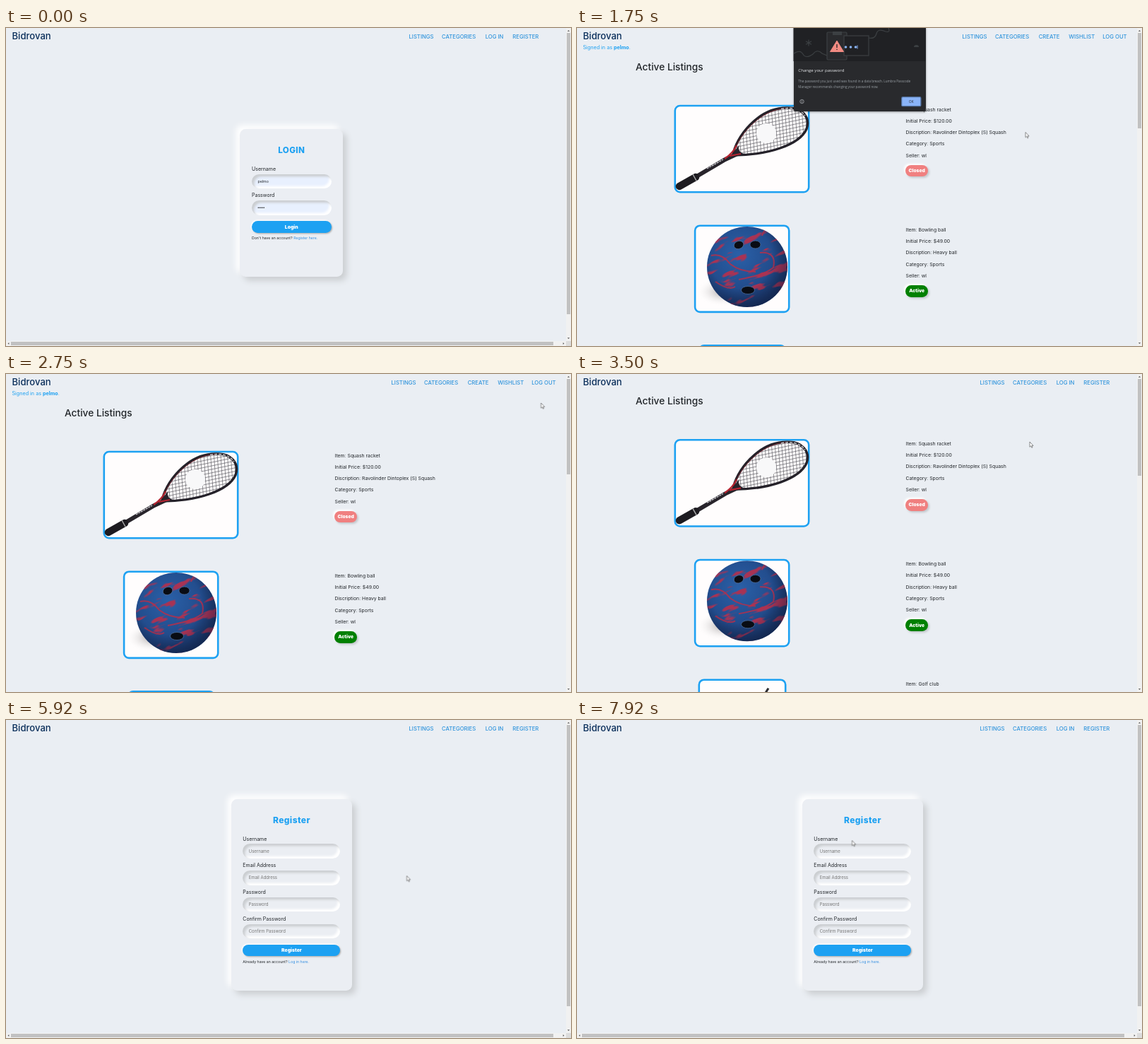
Animation of 800 by 450 pixels, one loop 8 s. Source, as an HTML page:

```html
<!DOCTYPE html>
<html lang="en">
<head>
<meta charset="utf-8">
<title>Bidding site walkthrough</title>
<style>
html, body { margin: 0; width: 100%; height: 100%; overflow: hidden; background: #eaeef3; }
#stage { position: relative; width: 800px; height: 450px; overflow: hidden; background: #eaeef3; }
#stage div { position: absolute; box-sizing: border-box; }
svg { position: absolute; left: 0; top: 0; width: 800px; height: 450px; overflow: hidden; }
#stage .defs { width: 0; height: 0; }
text { font-family: Inter, sans-serif; fill: #212529; white-space: pre; }
.page { inset: 0; }
.card { border-radius: 8.3px; background: #ebeef3; box-shadow: 5.4px 5.4px 8.3px #cbced1, -5.4px -5.4px 8.3px #fff; }
.field { border-radius: 10.4px; background: #ebeef3; box-shadow: inset 3.3px 3.3px 3.3px #cbced1, inset -3.3px -3.3px 3.3px #fff; }
.filled { background: #e8f0fe; }
.button { border-radius: 8.4px; background: #1da1f2; box-shadow: 1.25px 1.25px 2px #b1b1b1, -1.25px -1.25px 2px #fff; }
.badge { border-radius: 8.2px; box-shadow: 2px 2px 3px #c3c7cc, -2px -2px 3px #fff; }
.picture { fill: #fffdfd; stroke: #1da1f2; stroke-width: 2.6; }
.track { background: #f1f1f1; }
.thumb { background: #c1c1c1; }
.dark { background: #292a2d; border-radius: 2px; box-shadow: 0 1px 3px #0006; }
.ui text { font-family: "Open Sans", sans-serif; fill: #e8eaed; }
.ui .dim { fill: #9aa0a6; }
#stage .title { fill: #1da1f2; font-weight: 800; letter-spacing: .4px; }
.nav { fill: #2f94dc; font-weight: 500; }
.brand { fill: #0b2f5b; font-weight: 500; }
.heading { font-weight: 500; }
.link { fill: #2f8ce0; }
.white { fill: #fff; font-weight: 900; }

.login, .member, .guest, .register, .warning, .saved, .status, .caret { visibility: hidden; animation: 8s step-end infinite; }
.login { animation-name: login; }
.member { animation-name: member; }
.guest { animation-name: guest; }
.register { animation-name: register; }
.warning { animation-name: warning; }
.saved, .caret { animation-name: saved; }
.status { animation-name: status; }
@keyframes login { 0%, 50% { visibility: visible } 13.54%, 55.2% { visibility: hidden } }
@keyframes member { 13.54% { visibility: visible } 0%, 38.54% { visibility: hidden } }
@keyframes guest { 38.54% { visibility: visible } 0%, 50% { visibility: hidden } }
@keyframes register { 0% { visibility: hidden } 59.37%, 100% { visibility: visible } }
@keyframes warning { 17.7% { visibility: visible } 0%, 30.2% { visibility: hidden } }
@keyframes saved { 81.25% { visibility: visible } 0%, 89.58% { visibility: hidden } }
@keyframes status { 53.1% { visibility: visible } 0%, 65% { visibility: hidden } }

#cursor { animation: move 8s ease-in-out infinite; }
@keyframes move {
  0%, 3% { transform: translate(440px, 380px); opacity: 0 }
  3.1% { transform: translate(440px, 380px); opacity: 1 }
  10%, 13% { transform: translate(402px, 280px) }
  21.8%, 22.4% { transform: translate(635px, 147.5px) }
  28%, 30.2% { transform: translate(472px, 102px) }
  34.375% { transform: translate(757.5px, 41px) }
  36.5%, 38.5% { transform: translate(760px, 12px) }
  43.75% { transform: translate(641px, 96px) }
  47.5%, 50% { transform: translate(690px, 12px) }
  54% { transform: translate(738px, 15px) }
  57%, 59.5% { transform: translate(741px, 17px) }
  63.5% { transform: translate(640px, 130px) }
  69%, 90.6% { transform: translate(567.5px, 220.5px) }
  99%, 100% { transform: translate(389.5px, 170.5px); opacity: 1 }
}
</style>
</head>
<body>
<div id="stage"></div>
<script>
const BRAND = "Bidrovan", USER = "pelmo", SELLER = "wl";

const text = (x, y, size, str, cls = "", extra = "") =>
  `<text x="${x}" y="${y}" font-size="${size}" class="${cls}" ${extra}>${str}</text>`;
const middle = (x, y, size, str, cls) => text(x, y, size, str, cls, 'text-anchor="middle"');
const box = (x, y, w, h, cls, style = "") =>
  `<div class="${cls}" style="left:${x}px;top:${y}px;width:${w}px;height:${h}px;${style}"></div>`;
const layer = (cls, boxes, drawing) => `<div class="page ${cls}">${boxes}<svg>${drawing}</svg></div>`;
const dots = (x, y, n, step, r, fill) =>
  Array.from({ length: n }, (_, i) => `<circle cx="${x + i * step}" cy="${y}" r="${r}" fill="${fill}"/>`).join("");

const arrow = (x, y, turn) => `<path transform="translate(${x} ${y}) rotate(${turn})" d="M-1.6 .8L0-.9 1.6 .8z" fill="#505050"/>`;

function scrollbars(thumbEnd, wide) {
  const bottom = wide ? 443 : 450;
  let boxes = box(793, 0, 7, bottom, "track") + box(794, 7, 5, thumbEnd - 7, "thumb");
  let arrows = arrow(796.5, 4, 0) + arrow(796.5, bottom - 4, 180);
  if (wide) {
    boxes += box(0, 443, 793, 7, "track") + box(7, 444, 768, 5, "thumb") + box(793, 443, 7, 7, "", "background:#dcdcdc");
    arrows += arrow(3.5, 446.5, -90) + arrow(789.5, 446.5, 90);
  }
  return [boxes, arrows];
}

const nav = items => text(8.5, 16.3, 13.1, BRAND, "brand") +
  items.map(([x, label]) => text(x, 14.6, 7.7, label, "nav")).join("");
const guestNav = nav([[570.5, "LISTINGS"], [617, "CATEGORIES"], [678.7, "LOG IN"], [717.3, "REGISTER"]]);
const memberNav = nav([[545.5, "LISTINGS"], [592, "CATEGORIES"], [653.7, "CREATE"], [696.3, "WISHLIST"], [744.2, "LOG OUT"]]);

function loginPage() {
  const [bars, arrows] = scrollbars(405, true);
  return layer("login",
    bars + box(331, 143, 146, 208.5, "card") + box(348, 206.5, 113, 20.5, "field filled") +
    box(348, 244, 113, 20.5, "field filled") + box(348, 273.3, 113, 16.7, "button"),
    arrows + guestNav + middle(404.3, 177.3, 11.6, "LOGIN", "title") +
    text(348, 201.6, 7, "Username") + text(356.5, 218.8, 5.3, USER) +
    text(348, 239.2, 7, "Password") + dots(357.3, 254.2, 5, 2, .8, "#222") +
    middle(404.3, 284, 6.8, "Login", "white") +
    text(348, 299, 5.2, `Don't have an account? <tspan class="link">Register here.</tspan>`));
}

function registerPage() {
  const [bars, arrows] = scrollbars(405, true);
  const labels = ["Username", "Email Address", "Password", "Confirm Password"];
  const top = i => 175.4 + i * 37.7;
  return layer("register",
    bars + box(319, 112, 170.8, 271, "card") + labels.map((_, i) => box(335.3, top(i), 138, 20.5, "field")).join("") +
    box(335.3, 317.5, 138, 16.7, "button"),
    arrows + guestNav + middle(404.4, 146, 12, "Register", "title") +
    labels.map((s, i) => text(335.3, top(i) - 4.8, 7, s) + text(343.7, top(i) + 12.3, 6, s, "", 'style="fill:#757575"')).join("") +
    `<path class="caret" d="M344 293.7v10" stroke="#2f8ce0" stroke-width=".6"/>` +
    middle(404.4, 327.8, 6.8, "Register", "white") +
    text(335.3, 343.8, 5.2, `Already have an account? <tspan class="link">Log in here.</tspan>`));
}

const racket = `
  <path d="M221 180C224 156 256 112 298 113C318 112 331 126 325 143C315 165 272 180 221 180z" fill="url(#strings)" stroke="#25222a" stroke-width="3.400"/>
  <circle cx="268" cy="149" r="14" fill="#f8f8f9"/>
  <path d="M222 176C227 156 258 114 298 113.5" fill="none" stroke="#7d2029" stroke-width=".8"/>
  <path d="M289 114.500Q313 110 323 124" fill="none" stroke="#ddd" stroke-width="1.300" stroke-dasharray="4 2"/>
  <path d="M230 165Q226 174 236 178Q225 182 217 182z" fill="#27222a"/>
  <path d="M166 212L210 186 227 178" fill="none" stroke="#28242b" stroke-width="6"/>
  <path d="M209 185Q221 177 226 166M216 181L232 178" fill="none" stroke="#b52431" stroke-width="2.200"/>
  <path d="M184 199L207 186" stroke="#cfcfd4" stroke-width="1.300" stroke-dasharray="3 1"/>
  <path d="M145 224L168 211" stroke="#1d1b20" stroke-width="10.500" stroke-linecap="round"/>
  <path d="M164 207l5 9" stroke="#aaa" stroke-width="1.500"/>`;

const ball = `
  <ellipse cx="207" cy="373" rx="38" ry="21" fill="url(#floor)"/>
  <circle cx="241" cy="338" r="57" fill="url(#shell)"/>
  <g clip-path="url(#round)">
    <rect x="150" y="250" width="190" height="180" filter="url(#marble)" transform="rotate(-24 241 338)"/>
    <path d="M262 294Q266 282 272 286M259 318Q283 316 278 339Q267 349 229 356M190 322Q205 318 217 334Q231 345 253 345M196 359Q215 372 224 366"
      fill="none" stroke="#b5304a" stroke-width="2" opacity=".85"/>
    <circle cx="241" cy="338" r="57" fill="url(#shade)"/>
  </g>
  <g fill="#090c14" stroke="#5577a7" stroke-width=".7">
    <ellipse cx="229" cy="307" rx="7" ry="5.500" transform="rotate(-20 229 307)"/>
    <ellipse cx="252.500" cy="306.500" rx="7.500" ry="5.500"/>
    <ellipse cx="242" cy="371" rx="9.500" ry="5.500"/>
  </g>`;

const club = `<path d="M271 461.500L258 482" stroke="#2b2b2f" stroke-width="3"/>`;

const items = [
  { name: "Squash racket", price: "120.00", about: "Ravolinder Dintoplex (S) Squash", badge: "Closed", color: "#f08080", x: 137.5, w: 192 },
  { name: "Bowling ball", price: "49.00", about: "Heavy ball", badge: "Active", color: "#008000", x: 165.8, w: 135.7 },
  { name: "Golf club", price: "75.00", about: "Iron club", badge: "Active", color: "#008000", x: 171.5, w: 125 },
];

function listings(cls, shift, header, thumbEnd) {
  const [bars, arrows] = scrollbars(thumbEnd, false);
  let boxes = bars, rows = "";
  items.forEach((item, i) => {
    const base = 117.6 + i * 170.2;
    boxes += box(465.3, base + 76.2 - shift, 31.7, 16.5, "badge", `background:${item.color}`);
    const lines = [`Item: ${item.name}`, `Initial Price: $${item.price}`, `Discription: ${item.about}`, "Category: Sports", `Seller: ${SELLER}`];
    rows += `<rect class="picture" x="${item.x + 1.3}" y="${110 + i * 169.7}" width="${item.w - 2.6}" height="122.200" rx="7"/>` +
      lines.map((s, n) => text(465.5, base + n * 16.25, 6.85, s)).join("") +
      middle(481.2, base + 86.5, 6.7, item.badge, "white");
  });
  return layer(cls, boxes, arrows + header +
    `<g transform="translate(0 ${-shift})">${text(83, 60.2, 13.7, "Active Listings", "heading")}${rows}${racket}${ball}${club}</g>`);
}

function warning() {
  const art = `
    <rect x="306.500" width="187" height="47" fill="#202124"/>
    <g fill="none" stroke="#3c4043" stroke-width="1.200">
      <path d="M307 36Q316 30 320 37T334 37Q340 29 347 36L354 39M413 14Q422 16 424 8T437 5Q444 7 441 0"/>
      <path d="M328 16.500v9M324 18.700l8 4.600M332 18.700l-8 4.600"/>
      <rect x="354" y="6" width="28" height="39" rx="1.500" fill="#292a2d"/>
      <rect x="378" y="11" width="35" height="28" fill="#202124"/>
    </g>
    <path d="M362 5h13v5h-13z" fill="#3c4043"/>
    <path d="M477 27a3.500 3 0 0 1 7 0z" fill="#3c4043"/>
    <path d="M368 18L377.500 33.500h-19z" fill="#f28b82" stroke="#f28b82" stroke-linejoin="round"/>
    <path d="M368 23v5M368 29.800v1.300" stroke="#202124" stroke-width="1.300"/>
    ${dots(380.5, 27, 3, 7, 1.8, "#8ab4f8")}
    <path d="M397 24.500v5" stroke="#8ab4f8"/>
    <circle cx="318.500" cy="104" r="2.700" fill="none" stroke="#bdc1c6" stroke-width=".7"/>
    <path d="M318.500 103.500v2M318.500 102.200v.7" stroke="#bdc1c6" stroke-width=".7"/>
    <rect x="459.700" y="97.700" width="27.200" height="13" rx="1.500" fill="#8ab4f8" stroke="#53709d" stroke-width="1.200"/>`;
  return layer("ui warning", box(306.5, -2, 187, 119.5, "dark"), art +
    text(313.3, 62.2, 6.1, "Change your password") +
    text(313.3, 76.8, 4.6, "The password you just used was found in a data breach. Lumbra Passcode", "dim") +
    text(313.3, 85, 4.6, "Manager recommends changing your password now.", "dim") +
    text(473.3, 106, 4.6, "OK", "", 'text-anchor="middle" style="fill:#202124"'));
}

function savedLogins() {
  const globe = y => `<g fill="none" stroke="#9aa0a6" stroke-width=".8"><circle cx="385" cy="${y}" r="2.300" fill="#5f6368"/><path d="M383.500 ${y - 1}l1.500 1 1.500-1M385 ${y}v2"/></g>`;
  const accounts = [[USER, 5], ["Wo Luan", 2], [SELLER, 2]];
  return layer("ui saved", box(376.5, 313.3, 85.3, 94.7, "dark"),
    `<path d="M381 313.500l4.500-3.700 4.500 3.700z" fill="#292a2d"/>` +
    accounts.map(([name, n], i) => {
      const y = 327.2 + i * 24.2;
      return globe(y) + text(393.2, y - 2.4, 5.3, name) + dots(394.2, y + 4.8, n, 2.3, .7, "#9aa0a6");
    }).join("") +
    `<path d="M377 389.700h84.500" stroke="#3f4145" stroke-width=".6"/><circle cx="385" cy="398.800" r="2.500" fill="#9aa0a6"/>` +
    text(393.2, 400.8, 5.4, "Manage passwords...", "dim") + `<circle cx="452.300" cy="398.800" r="2.500" fill="#4285f4"/>`);
}

const defs = `<svg class="defs"><defs>
  <pattern id="strings" width="4.800" height="4.800" patternUnits="userSpaceOnUse" patternTransform="rotate(-12) skewX(-8)">
    <path d="M0 .5h4.800M.5 0v4.800" stroke="#55545c" stroke-width=".65"/></pattern>
  <radialGradient id="shell" cx=".4" cy=".35" r=".7"><stop stop-color="#2a60a8"/><stop offset=".6" stop-color="#224c8c"/><stop offset="1" stop-color="#1b3363"/></radialGradient>
  <radialGradient id="shade" cx=".42" cy=".38" r=".65"><stop offset=".6" stop-color="#0a1838" stop-opacity="0"/><stop offset="1" stop-color="#0a1838" stop-opacity=".5"/></radialGradient>
  <radialGradient id="floor"><stop stop-color="#aaa5a5"/><stop offset="1" stop-color="#fff" stop-opacity="0"/></radialGradient>
  <clipPath id="round"><circle cx="241" cy="338" r="57"/></clipPath>
  <filter id="marble" x="0" y="0" width="1" height="1" color-interpolation-filters="sRGB">
    <feTurbulence type="fractalNoise" baseFrequency=".03 .11" numOctaves="3" seed="8"/>
    <feColorMatrix values="0 0 0 0 .66  0 0 0 0 .2  0 0 0 0 .33  0 0 0 9 -5.100"/></filter>
</defs></svg>`;

const signedIn = text(8.5, 29.8, 7.2, `Signed in as <tspan font-weight="700">${USER}</tspan>.`, "", 'style="fill:#1da1f2"');
const status = layer("ui status", box(0, 441.3, 55, 8.7, "", "background:#000;border-radius:0 2px 0 0"),
  text(2, 447.4, 4.5, "lots.example:9/register"));
const cursor = `<svg><path id="cursor" d="M0 0v7.300l1.700-1.500 1.200 2.500 1.100-.5-1.100-2.400h2.200z" fill="#fff" stroke="#444" stroke-width=".6"/></svg>`;

document.getElementById("stage").innerHTML = defs + loginPage() +
  listings("member", 0, memberNav + signedIn, 142) + listings("guest", 16.7, guestNav, 144) +
  registerPage() + warning() + savedLogins() + status + cursor;
</script>
</body>
</html>
```
